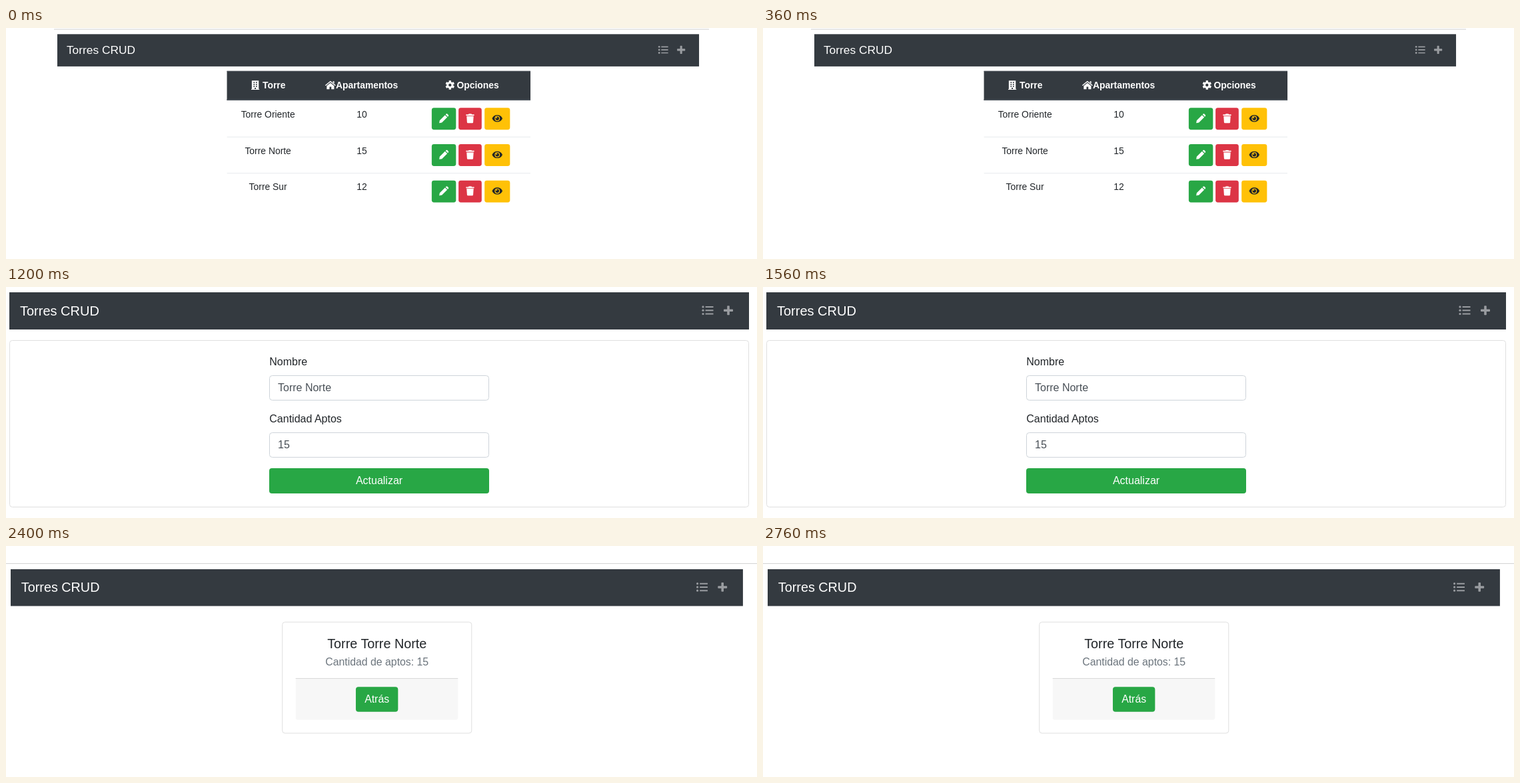
Recreate the animation shown at these times as an HTML page. Size 1127 by 348 pixels, loop 3 s.

```html
<!DOCTYPE html>
<html lang="es">
<head>
<meta charset="utf-8">
<title>Torres CRUD</title>
<style>
  html, body { margin: 0; width: 100%; height: 100%; overflow: hidden; background: #fff; }
  svg { display: block; width: 100vw; height: 100vh; }
  text { font: 16px "Liberation Sans", Arial, sans-serif; fill: #212529; }
  .mid { text-anchor: middle; }
  .big { font-size: 20px; }
  .bold { font-weight: bold; }
  .white { fill: #fff; }
  .value { fill: #495057; }
  .muted { fill: #6c757d; }
  .dark { fill: #343a40; }
  .green { fill: #28a745; }
  .red { fill: #dc3545; }
  .yellow { fill: #ffc107; }
  .ink { fill: #212529; }
  .card { fill: #fff; stroke: #dfdfdf; }
  .input { fill: #fff; stroke: #ced4da; }
  .icon { fill: #999ca0; }
  .plus { fill: var(--plus, #999ca0); }
  .scene { visibility: hidden; animation: show 3s step-end infinite; animation-delay: calc(var(--i) * .6s - 3s); }
  @keyframes show {
    0% { visibility: visible; }
    20%, 100% { visibility: hidden; }
  }
</style>
</head>
<body>
<svg viewBox="0 0 1127 348" preserveAspectRatio="none">
  <defs>
    <g id="nav">
      <rect class="dark" width="1110" height="56"/>
      <text class="big white" x="16" y="34.7">Torres CRUD</text>
      <g class="icon" transform="translate(1048 27.2)">
        <circle cx="-7" cy="-5.3" r="1.6"/>
        <circle cx="-7" r="1.6"/>
        <circle cx="-7" cy="5.3" r="1.6"/>
        <path d="M-3.4-6.3H8.5v2H-3.4zM-3.4-1H8.5v2H-3.4zM-3.4 4.3H8.5v2H-3.4z"/>
      </g>
      <path class="plus" transform="translate(1079 27.2)"
        d="M-1-7h2q.8 0 .8.8v4.4h4.4q.8 0 .8.8v2q0 .8-.8.8H1.8v4.4q0 .8-.8.8h-2q-.8 0-.8-.8V1.8h-4.4q-.8 0-.8-.8v-2q0-.8.8-.8h4.4v-4.4q0-.8.8-.8z"/>
    </g>

    <g id="buttons">
      <rect class="green" x="647.6" y="128" width="42" height="38" rx="4"/>
      <rect class="red" x="694" y="128" width="40" height="38" rx="4"/>
      <rect class="yellow" x="739" y="128" width="44" height="38" rx="4"/>
      <path class="white" transform="translate(668.6 146.3)"
        d="M-8 8l.8-4.6L2-5.8 5.8-2-3.4 7.2zM3-6.8l1-1q1-.8 2 0L7.8-6q.8 1 0 2l-1 1z"/>
      <path class="white" transform="translate(714 146.3)"
        d="M-7-7h4l.8-1h4.4l.8 1h4v2H-7zM-6-4H6l-.7 10.6Q5.2 8 3.8 8h-7.6q-1.4 0-1.5-1.4z"/>
      <g transform="translate(761 146.3)">
        <path class="ink" d="M-9 0C-6-8 6-8 9 0 6 8-6 8-9 0z"/>
        <circle class="yellow" r="4.5"/>
        <circle class="ink" r="3.1"/>
        <circle class="yellow" cx="-1.3" cy="-1.4" r="1.2"/>
      </g>
    </g>

    <g id="list">
      <use href="#nav"/>
      <rect class="dark" x="293.4" y="64" width="525" height="51"/>
      <path fill="#454d55" d="M293.4 64h525v1h-525zM293.4 113h525v2h-525z"/>
      <path class="white" fill-rule="evenodd" transform="translate(335.4 80.5)"
        d="M1 0h12v14.8h1V16H0v-1.2h1zM4 2.4v2h2v-2zM8 2.4v2h2v-2zM4 5.8v2h2v-2zM8 5.8v2h2v-2zM4 9.2v2h2v-2zM8 9.2v2h2v-2zM5.8 12.4v2.4h2.4v-2.4z"/>
      <g transform="translate(472.4 88.5)">
        <path fill="none" stroke="#fff" stroke-width="1.7" stroke-linecap="round" stroke-linejoin="round" d="M-8.1.2L0-6.4 8.1.2"/>
        <path class="white" d="M4.2-6.6h2.4v4L4.2-4.6zM0-3.8L6.4 1.4V7H1.6V2.8h-3.2V7h-4.8V1.4z"/>
      </g>
      <g fill="none" stroke="#fff" transform="translate(679.2 88.3) rotate(-90)">
        <circle r="4.2" stroke-width="3.4"/>
        <circle r="6.4" stroke-width="3" pathLength="12" stroke-dasharray="1.1 .9" stroke-dashoffset=".55"/>
      </g>
      <text class="bold white" x="355" y="94.3">Torre</text>
      <text class="bold white" x="481.8" y="94.3">Apartamentos</text>
      <text class="bold white" x="691" y="94.3">Opciones</text>
      <path fill="#dee2e6" d="M293.4 178h525v1h-525zM293.4 241h525v1h-525z"/>
      <g class="mid">
        <text x="364.4" y="144.8">Torre Oriente</text>
        <text x="364.4" y="207.8">Torre Norte</text>
        <text x="364.4" y="270.8">Torre Sur</text>
        <text x="526.7" y="207.8">15</text>
        <text x="526.7" y="270.8">12</text>
      </g>
      <use href="#buttons"/>
      <use href="#buttons" y="63"/>
      <use href="#buttons" y="126"/>
    </g>

    <g id="form">
      <use href="#nav"/>
      <rect class="card" x=".5" y="72.5" width="1109" height="251" rx="4"/>
      <text x="390.3" y="110">Nombre</text>
      <rect class="input" x="390.5" y="125.5" width="329" height="37" rx="4"/>
      <text x="390.3" y="196">Cantidad Aptos</text>
      <rect class="input" x="390.5" y="211.5" width="329" height="37" rx="4"/>
    </g>
  </defs>

  <g class="scene" style="--i:0">
    <rect x="72" y="1.4" width="983" height="1.2" fill="#d8d8d8"/>
    <g transform="translate(77 9.3) scale(.8676)">
      <use href="#list"/>
      <text class="mid" x="526.7" y="144.8">10</text>
    </g>
  </g>

  <g class="scene" style="--i:1;--plus:#d6d8d9">
    <g transform="translate(8 5) scale(.992)">
      <use href="#form"/>
      <rect x="390" y="265" width="330" height="38" rx="4" fill="#74c687"/>
      <text class="mid white" x="555" y="289">Crear</text>
    </g>
  </g>

  <g class="scene" style="--i:2">
    <g transform="translate(5 8)">
      <use href="#form"/>
      <text class="value" x="403" y="149">Torre Norte</text>
      <text class="value" x="403" y="235">15</text>
      <rect class="green" x="390" y="265" width="330" height="38" rx="4"/>
      <text class="mid white" x="555" y="289">Actualizar</text>
    </g>
  </g>

  <g class="scene" style="--i:3">
    <rect width="1127" height="348"/>
    <rect class="white" x="283" width="560" height="348"/>
    <g transform="translate(289.2 5.7) scale(.494)">
      <use href="#list"/>
      <text class="mid" x="526.7" y="144.8">11</text>
    </g>
    <rect x="283" y="1.6" width="560" height="346.4" opacity=".4"/>
    <rect class="white" x="437" y="161.5" width="253" height="159.5" rx="2.5"/>
    <circle cx="563.5" cy="202.8" r="20.8" fill="none" stroke="#e4f5db" stroke-width="2"/>
    <path d="M552.3 203.5l8 8L575.6 195" fill="none" stroke="#a5dc86" stroke-width="2.5" stroke-linecap="round"/>
    <text class="mid bold" x="563.3" y="253.2" style="font-size:14.9px;fill:#595959">Exito!</text>
    <text class="mid" x="563.3" y="271" style="font-size:8.9px;fill:#545454">La torre se actualizo</text>
    <rect x="541" y="284.7" width="44.6" height="25" rx="2.6" fill="#adc1d5"/>
    <rect class="white" x="542" y="285.6" width="42.7" height="23.2" rx="2"/>
    <rect x="542.6" y="286.2" width="41.5" height="22" rx="1.8" fill="#3085d6"/>
    <text class="mid white" x="563.3" y="300" style="font-size:8.5px">ok</text>
  </g>

  <g class="scene" style="--i:4">
    <rect y="26" width="1127" height="1" fill="#d3d3d3"/>
    <g transform="translate(7 35) scale(.99)">
      <use href="#nav"/>
      <rect class="card" x="411.8" y="80.5" width="287" height="169" rx="4"/>
      <text class="mid big" x="555.3" y="120">Torre Torre Norte</text>
      <text class="mid muted" x="555.3" y="146">Cantidad de aptos: 15</text>
      <path fill="#f7f7f7" d="M432 166h246v60q0 3-3 3H435q-3 0-3-3z"/>
      <rect x="432" y="165.7" width="246" height="1" fill="#d8d8d8"/>
      <rect class="green" x="523.2" y="179" width="64" height="38" rx="4"/>
      <text class="mid white" x="555.2" y="203">Atrás</text>
    </g>
  </g>
</svg>
</body>
</html>
```
